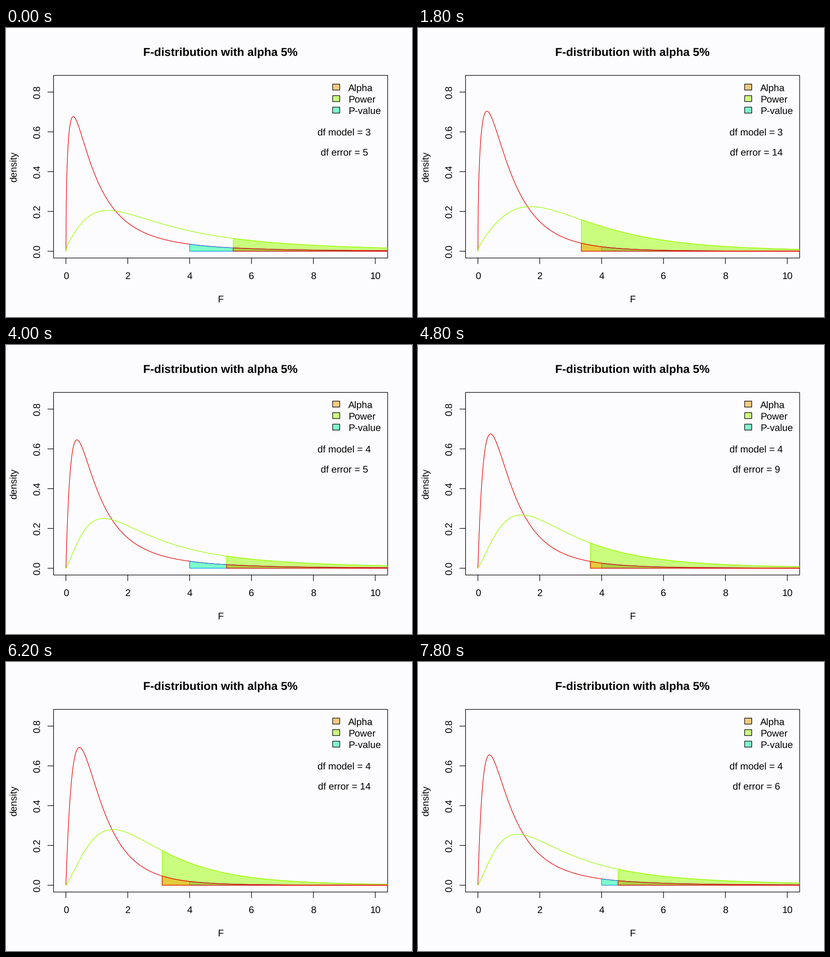
These frames come from a looping animation (885x632 px, 8000 ms). A matplotlib script:

```python
import math

import matplotlib.pyplot as plt
import numpy as np
from matplotlib.animation import FuncAnimation
from matplotlib.patches import Polygon, Rectangle

W, H, DPI = 885, 632, 100
PX = 72 / DPI                      # points per pixel
LW = 1.3 * PX
NCP = 6                            # noncentrality of the power curve
F_OBS = 4
ALPHA = 0.05
RED, GREEN, BLUE = "#e60000", "#99ff00", "#1c86ee"
ORANGE_FILL, GREEN_FILL, TEAL_FILL = (1, .6, 0, .5), (.6, 1, 0, .5), (0, 1, .6, .5)

plt.rcParams.update({
    "font.family": "Liberation Sans",
    "font.size": 21 * PX,
    "text.hinting": "none",
    "path.snap": False,
})

# plot box in pixels and its data limits
LEFT, RIGHT, TOP, BOTTOM = 103.6, 831.9, 103.6, 503.0
X0, X1, Y0, Y1 = -0.4, 10.4, -0.034, 0.884


def px(x):
    return LEFT + (x - X0) / (X1 - X0) * (RIGHT - LEFT)


def py(y):
    return BOTTOM - (y - Y0) / (Y1 - Y0) * (BOTTOM - TOP)


def f_pdf(x, d1, d2):
    a, b = d1 / 2, d2 / 2
    scale = math.gamma(a + b) / (math.gamma(a) * math.gamma(b)) * (d1 / d2) ** a
    return scale * x ** (a - 1) * (1 + d1 * x / d2) ** -(a + b)


def ncf_pdf(x, d1, d2):
    """Noncentral F density: central density times a 1F1 series."""
    a, b = (d1 + d2) / 2, d1 / 2
    z = NCP / 2 * d1 * x / (d1 * x + d2)
    term = np.ones_like(x)
    total = term.copy()
    for k in range(60):
        term = term * (a + k) / (b + k) * z / (k + 1)
        total += term
    return f_pdf(x, d1, d2) * math.exp(-NCP / 2) * total


def f_critical(d1, d2):
    s = np.linspace(0, 3.5, 8001)
    g = f_pdf(s * s, d1, d2) * 2 * s
    cdf = np.concatenate([[0], np.cumsum((g[1:] + g[:-1]) / 2 * np.diff(s))])
    return np.interp(1 - ALPHA, cdf, s) ** 2


fig = plt.figure(figsize=(W / DPI, H / DPI), dpi=DPI, facecolor="#fcfcfe")
page = fig.add_axes([0, 0, 1, 1])
page.set(xlim=(0, W), ylim=(H, 0))
page.axis("off")


def label(x, y, text, ha="center", **kw):
    return page.text(x, y, text, ha=ha, va="baseline", rotation_mode="anchor", **kw)


def line(xs, ys):
    page.plot(xs, ys, color="black", lw=LW, solid_capstyle="round")


label(467.5, 61.2, "F-distribution with alpha 5%", weight="bold", size=25.2 * PX)
label(467.5, 600, "F")
label(23, (TOP + BOTTOM) / 2, "density", rotation=90)

page.add_patch(Rectangle((LEFT, TOP), RIGHT - LEFT, BOTTOM - TOP,
                         fill=False, ec="black", lw=LW))
for v in range(0, 11, 2):
    line([px(v)] * 2, [BOTTOM, BOTTOM + 12.6])
    label(px(v), 549.2, str(v))
for i in range(5):
    v = i * 0.2
    line([LEFT - 12.6, LEFT], [py(v)] * 2)
    label(73.6, py(v), f"{v:.1f}", rotation=90)

keys = [("Alpha", ORANGE_FILL), ("Power", GREEN_FILL), ("P-value", TEAL_FILL)]
for i, (name, fill) in enumerate(keys):
    y = 129.2 + 25.2 * i
    page.add_patch(Rectangle((712, y - 6.5), 15.5, 13, fc=fill, ec="black", lw=LW))
    label(746, y + 8, name, ha="left")

model_text = label(px(9), 235.2, "")
error_text = label(px(9), 278.8, "")

plot = fig.add_axes([LEFT / W, 1 - BOTTOM / H, (RIGHT - LEFT) / W, (BOTTOM - TOP) / H])
plot.set(xlim=(X0, X1), ylim=(Y0, Y1))
plot.axis("off")

X = np.linspace(0, 11, 1101)
red_curve, = plot.plot([], [], color=RED, lw=LW)
green_curve, = plot.plot([], [], color=GREEN, lw=LW)


def region(fill, edge, z):
    patch = Polygon([(0, 0), (1, 0), (1, 0)], fc=fill, ec=edge, lw=LW, zorder=z)
    return plot.add_patch(patch)


power_area = region(GREEN_FILL, GREEN, 3)
p_area = region(TEAL_FILL, BLUE, 4)
alpha_area = region(ORANGE_FILL, RED, 5)


def set_tail(patch, pdf, start, d1, d2):
    x = np.linspace(start, 11, 400)
    tail = np.column_stack([x, pdf(x, d1, d2)])
    patch.set_xy(np.vstack([[start, 0], tail, [11, 0]]))


def draw(i):
    d1 = 3 + i // 20
    d2 = 15 - abs(i % 20 - 10)
    crit = f_critical(d1, d2)
    red_curve.set_data(X, f_pdf(X, d1, d2))
    green_curve.set_data(X, ncf_pdf(X, d1, d2))
    set_tail(power_area, ncf_pdf, crit, d1, d2)
    set_tail(p_area, f_pdf, F_OBS, d1, d2)
    set_tail(alpha_area, f_pdf, crit, d1, d2)
    model_text.set_text(f"df model = {d1}")
    error_text.set_text(f"df error = {d2}")
    return red_curve, green_curve, power_area, p_area, alpha_area, model_text, error_text


anim = FuncAnimation(fig, draw, frames=40, interval=200, repeat=True, repeat_delay=0)
plt.show()
```
